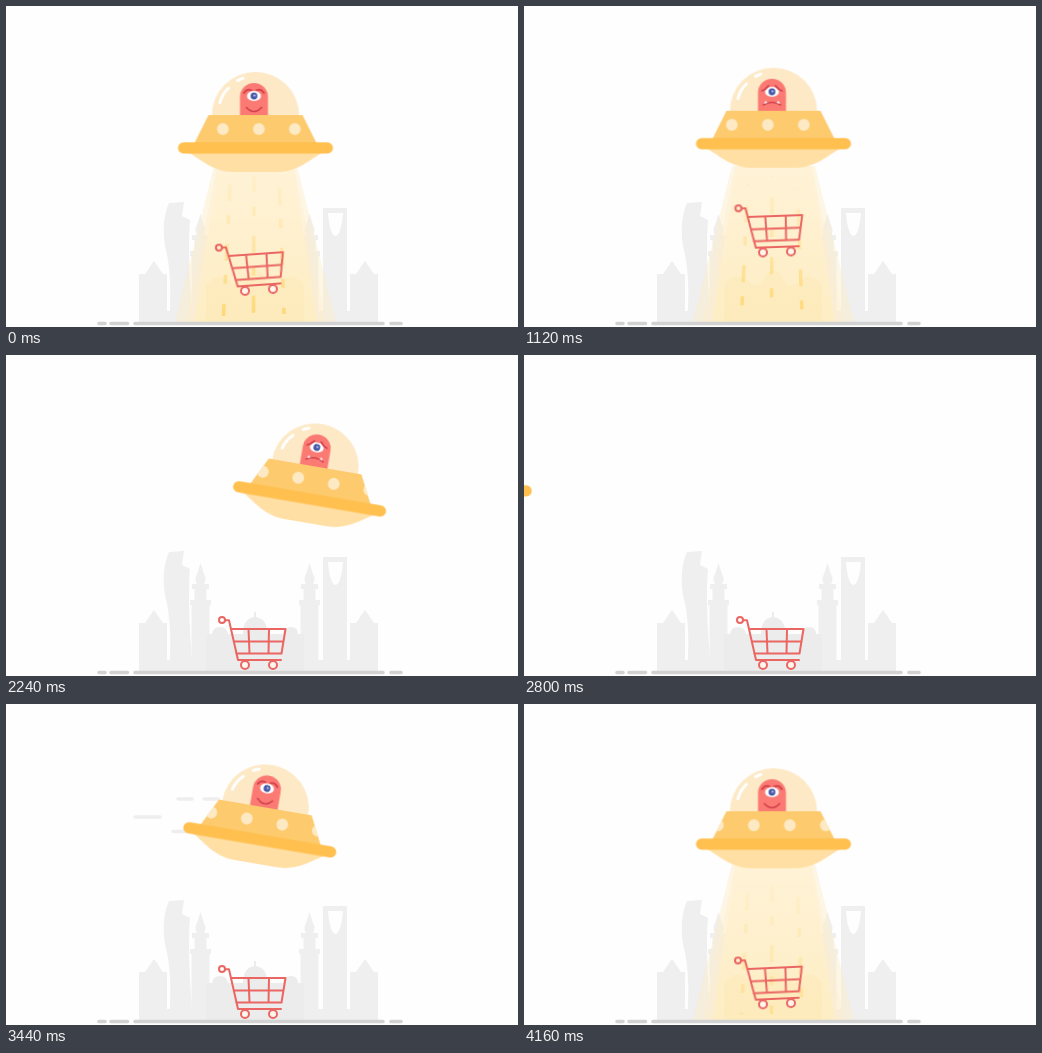
An HTML page that plays this animation: 512x321 px, repeating every 4.24 s.

```html
<!DOCTYPE html>
<html lang="en">
<head>
<meta charset="utf-8">
<title>Saucer and cart</title>
<style>
  html, body { margin: 0; width: 100%; height: 100%; overflow: hidden; background: #fefefe; }
  svg { display: block; width: 100vw; height: 100vh; }
  .anim { animation: 4240ms linear infinite; }

  #ship-x { animation-name: ship-x; }
  #ship-y { animation-name: ship-y; }
  #ship-tilt { animation-name: ship-tilt; }
  #lights { animation-name: lights; }
  #happy { animation-name: happy; }
  #sad { animation-name: sad; }
  #beam { animation-name: beam; transform-origin: 249.5px 160px; }
  #dashes { animation-name: dash-fade; }
  #dashes path { animation-name: dash-flow; }
  #lift { animation-name: lift; }
  #sway { animation-name: sway; transform-origin: 253px 310px; }
  #streaks { animation-name: streaks; }

  @keyframes ship-x {
    0%, 39.15% { transform: translateX(249.5px); animation-timing-function: ease-in-out; }
    47.17% { transform: translateX(226px); animation-timing-function: cubic-bezier(.4, 0, .8, .9); }
    63.21%, 64.14% { transform: translateX(620px); }
    64.15% { transform: translateX(-120px); animation-timing-function: cubic-bezier(.3, .4, .55, 1); }
    84.91% { transform: translateX(267px); animation-timing-function: ease-in-out; }
    94.34%, 100% { transform: translateX(249.5px); }
  }
  @keyframes ship-y {
    0% { transform: translateY(142px); animation-timing-function: ease-out; }
    6.6% { transform: translateY(143.3px); animation-timing-function: ease-in-out; }
    21.93% { transform: translateY(137px); animation-timing-function: ease-in-out; }
    41.51%, 64.14% { transform: translateY(144px); }
    64.15%, 81.13% { transform: translateY(136px); animation-timing-function: cubic-bezier(.6, 0, 1, .8); }
    100% { transform: translateY(142px); }
  }
  @keyframes ship-tilt {
    0%, 40.09% { transform: rotate(0deg); animation-timing-function: ease-in-out; }
    47.17% { transform: rotate(-3deg); animation-timing-function: ease-in-out; }
    52.83%, 64.14% { transform: rotate(9.7deg); }
    64.15%, 66.04% { transform: rotate(0deg); animation-timing-function: ease-in-out; }
    71.7%, 81.13% { transform: rotate(9.7deg); animation-timing-function: ease-in-out; }
    87.74% { transform: rotate(-2deg); animation-timing-function: ease-in-out; }
    94.34%, 100% { transform: rotate(0deg); }
  }
  @keyframes lights {
    0% { stroke-dashoffset: -3.5px; }
    64.14% { stroke-dashoffset: 280.7px; }
    64.15% { stroke-dashoffset: -131px; }
    100% { stroke-dashoffset: 27.9px; }
  }
  @keyframes happy {
    0%, 22.63% { opacity: 1; }
    22.64%, 64.14% { opacity: 0; }
    64.15%, 100% { opacity: 1; }
  }
  @keyframes sad {
    0%, 22.63% { opacity: 0; }
    22.64%, 64.14% { opacity: 1; }
    64.15%, 100% { opacity: 0; }
  }
  @keyframes beam {
    0%, 28.3% { opacity: 1; transform: scale(1, 1); }
    33.96% { opacity: 0; transform: scale(.5, 1); }
    33.97%, 86.79% { opacity: 0; transform: scale(1, 0); animation-timing-function: ease-out; }
    92.45%, 100% { opacity: 1; transform: scale(1, 1); }
  }
  @keyframes dash-fade {
    0%, 30% { opacity: 1; }
    31%, 92% { opacity: 0; }
    98.11% { opacity: .6; }
    100% { opacity: 1; }
  }
  @keyframes dash-flow {
    from { stroke-dashoffset: 0; }
    to { stroke-dashoffset: 600px; }
  }
  @keyframes lift {
    0% { transform: translateY(-26px); animation-timing-function: ease-out; }
    5.66% { transform: translateY(-32px); }
    16.98% { transform: translateY(-33.5px); animation-timing-function: ease-in-out; }
    26.42% { transform: translateY(-64px); animation-timing-function: ease-out; }
    29.25% { transform: translateY(-66px); animation-timing-function: ease-in; }
    36.79% { transform: translateY(0); animation-timing-function: ease-out; }
    38.68% { transform: translateY(-5px); animation-timing-function: ease-in; }
    40.57%, 91.98% { transform: translateY(0); animation-timing-function: cubic-bezier(.7, 0, 1, .7); }
    100% { transform: translateY(-26px); }
  }
  @keyframes sway {
    0% { transform: rotate(-4deg); animation-timing-function: ease-in-out; }
    16.98% { transform: rotate(5deg); animation-timing-function: ease-in-out; }
    26.42%, 29.25% { transform: rotate(-2deg); animation-timing-function: ease-in; }
    36.79%, 91.98% { transform: rotate(0deg); animation-timing-function: ease-in; }
    100% { transform: rotate(-4deg); }
  }
  @keyframes streaks {
    0%, 77.36% { opacity: 0; transform: translateX(-3px); }
    79.25%, 81.13% { opacity: 1; transform: translateX(0); }
    84.91%, 100% { opacity: 0; transform: translateX(12px); }
  }
</style>
</head>
<body>
<svg viewBox="0 0 512 321" preserveAspectRatio="none">
  <defs>
    <linearGradient id="glow" x1="0" y1="160" x2="0" y2="316" gradientUnits="userSpaceOnUse">
      <stop offset="0" stop-color="#fff2d6"/>
      <stop offset="1" stop-color="#fdedc2"/>
    </linearGradient>
    <linearGradient id="dash" x1="0" y1="175" x2="0" y2="312" gradientUnits="userSpaceOnUse">
      <stop offset="0" stop-color="#ffe7a8" stop-opacity=".3"/>
      <stop offset="1" stop-color="#ffd876"/>
    </linearGradient>
    <clipPath id="hull"><path d="M-47-33H47L61-5H-61Z"/></clipPath>
    <g id="minaret">
      <path d="M194.500 208L198 219Q201 224 198 229H203V234H200.500V245H205V250H203.500V316H185.500V250H184V245H188.500V234H186V229H191Q188 224 191 219Z"/>
    </g>
    <g id="house">
      <path d="M133 316V268H139L148 255L157 268H161V316Z"/>
    </g>
  </defs>

  <g fill="#efefef">
    <use href="#house"/>
    <use href="#house" x="211"/>
    <path d="M163 197L178 196L176 210L184 214Q181 250 187 316H163Q167 270 159 240Q155 215 163 197Z"/>
    <use href="#minaret"/>
    <use href="#minaret" x="109"/>
    <path fill-rule="evenodd" d="M317 202H341V316H317ZM322 207C323 221 326 230 329.500 230S336 221 337 207Z"/>
    <path d="M161 312V305H345V316H161Z"/>
    <path d="M200 316V279H206Q207 272 214 272T222 279H237Q237 264 248 262V257H250V262Q261 264 262 279H277Q278 272 285 272T292 279H298V316Z" fill="#ececec"/>
  </g>

  <g id="beam" class="anim">
    <path d="M208 160H291L330 316H169Z" fill="#fdeec8" opacity=".45"/>
    <path d="M211 160H288L320 316H179Z" fill="#fdeec8" opacity=".4"/>
    <path d="M213 160H287L311 316H188Z" fill="url(#glow)" opacity=".93"/>
    <path d="M200 316V279Q214 262 228 279H237Q249 248 262 279H271Q285 262 298 279V316Z" fill="#fae3a8" opacity=".3"/>
    <g id="dashes" class="anim" fill="none" stroke="url(#dash)" stroke-width="3.500" stroke-dasharray="17 14 9 20">
      <path class="anim" d="M224 178L217.500 310"/>
      <path class="anim" d="M248 170L247.500 310"/>
      <path class="anim" d="M273.500 182L278 308"/>
    </g>
  </g>

  <path d="M93 317.500H99M105 317.500H121.500M129 317.500H377M385 317.500H395" stroke="#d2d2d2" stroke-width="3.600" stroke-linecap="round"/>

  <g id="lift" class="anim">
    <g id="sway" class="anim" fill="none" stroke="#ea6662" stroke-width="2" stroke-linecap="round" stroke-linejoin="round">
      <circle cx="216" cy="265" r="3"/>
      <path d="M219 265.300H223L232 305H275"/>
      <path d="M225 274H279.500L275.500 298.500H230.500M228 286.500H277.500M242.500 274L243.500 298.500M263 274L262.500 298.500"/>
      <circle cx="239" cy="310" r="4" fill="#fff6ee"/>
      <circle cx="267" cy="310" r="4" fill="#fff6ee"/>
    </g>
  </g>

  <g id="streaks" class="anim" stroke="#eeeeee" stroke-width="3.500" stroke-linecap="round">
    <path d="M129 113H154M172 95H186M198 95H212M167 127.500H183"/>
  </g>

  <g id="ship-x" class="anim"><g id="ship-y" class="anim"><g id="ship-tilt" class="anim">
    <path d="M-43.500-32V-33A43.500 43 0 0 1 43.500-33V-32Z" fill="#fde9c6"/>
    <path d="M-15.500-32V-51A14 14 0 0 1 12.500-51V-32Z" fill="#fb7a74"/>
    <ellipse cx="-1.500" cy="-52" rx="7" ry="5" fill="#fff"/>
    <circle cx="-1.500" cy="-52" r="3.400" fill="#4657a6"/>
    <circle cx="-1" cy="-52.500" r="1" fill="#cfd6f5"/>
    <g fill="none" stroke="#cf3f4a" stroke-width="1.700" stroke-linecap="round">
      <g id="happy" class="anim">
        <path d="M-11.500-55Q-9-59.500-4-58M1-58Q6-59.500 8.500-55M-9-40.500Q-1.500-32.500 6-40.500"/>
      </g>
      <g id="sad" class="anim">
        <path d="M-11.500-53Q-8-54-5-58M2-58Q5-54 8.500-53M-10-39Q-1.500-44 7-39"/>
        <path d="M-9.500-40L-8-43L-6-41ZM6.500-40L5-43L3-41Z" fill="#fff" stroke="none"/>
      </g>
    </g>
    <path d="M-35.500-45.500Q-33.500-54-27-60M-18-67.500L-12.500-69.800" fill="none" stroke="#fff" stroke-width="3" stroke-linecap="round"/>
    <path d="M-68 4C-55 11-42 24-22 24H22C42 24 55 11 68 4Z" fill="#ffdfa3"/>
    <path d="M-47-33H47L61-5H-61Z" fill="#fdca6e"/>
    <g clip-path="url(#hull)">
      <path id="lights" class="anim" d="M-72-19H72" stroke="#fdeac4" stroke-width="11.800" stroke-linecap="round" stroke-dasharray="0 36"/>
    </g>
    <rect x="-77.500" y="-5.700" width="155" height="11.200" rx="5.600" fill="#ffc04f"/>
  </g></g></g>
</svg>
</body>
</html>
```
